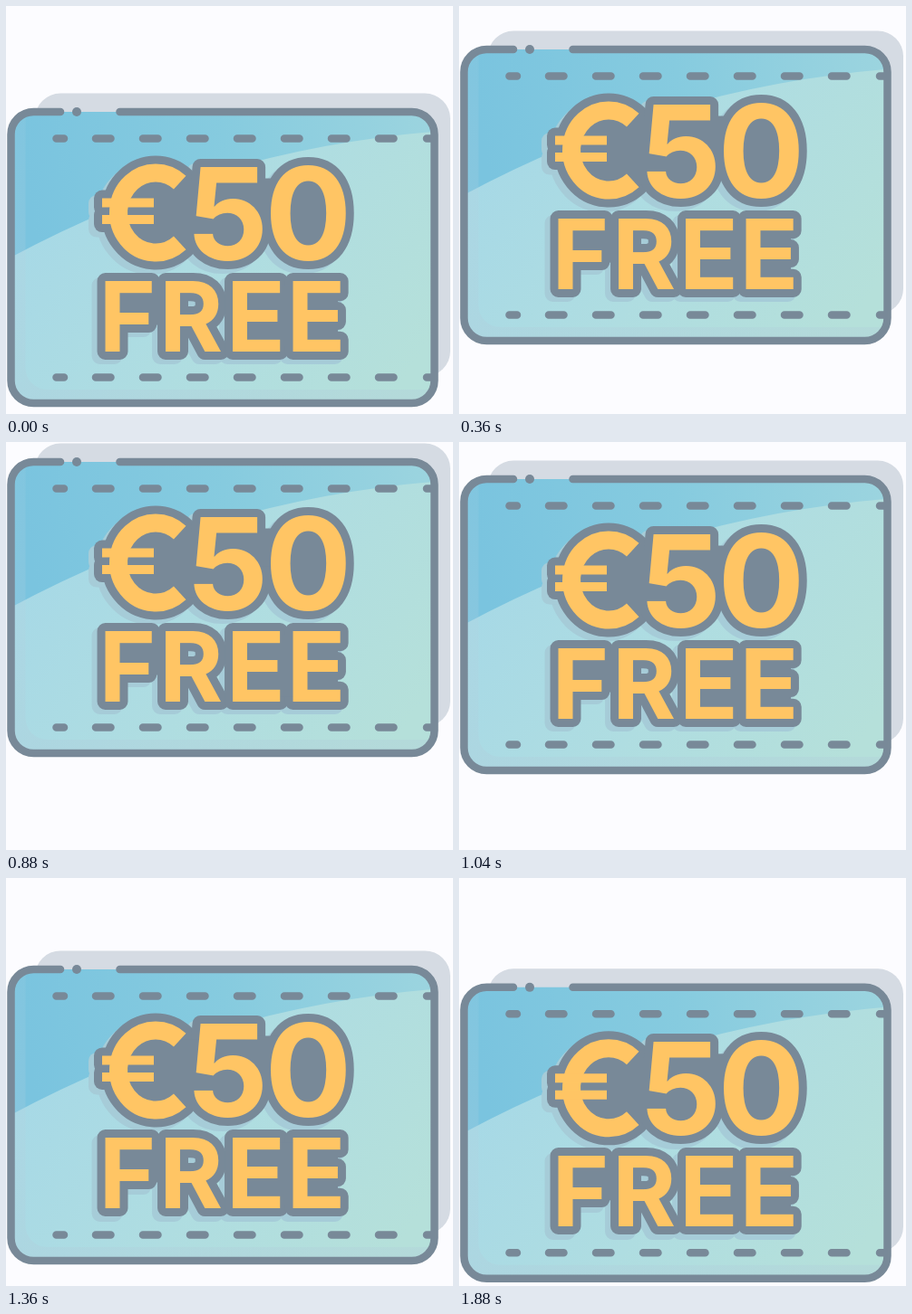
Animation of 493x451 px, one loop 1920 ms. Source, as an HTML page with a canvas:

```html
<!DOCTYPE html>
<html lang="en">
<head>
<meta charset="utf-8">
<title>Voucher</title>
<style>
html, body { margin: 0; width: 100%; height: 100%; overflow: hidden; background: #fcfcff; }
canvas { display: block; width: 493px; height: 451px; }
</style>
</head>
<body>
<canvas id="stage" width="493" height="451" role="img" aria-label="€50 FREE"></canvas>
<script>
const ctx = document.getElementById('stage').getContext('2d');
const LOOP = 1920, HALF = LOOP / 2, STEP = 40, LEAD = 66;
const HOLDS = [6, 39];
const LOW = 101.8, HIGH = 1.5, REST = 96;
const TOP = 116.5, BOTTOM = 438.5;
const GRAY = '#788998', GOLD = '#ffc564', SHADE = '#a6ccd8';

// glyph, centre of its ink
const rows = [
  { size: 142, base: 280, glyphs: [['5', 245], ['0', 333.5]] },
  { size: 107, base: 381, glyphs: [['F', 135.5], ['R', 207], ['E', 276.5], ['E', 343]] }
];

for (const row of rows) {
  row.font = `700 ${row.size}px Inter, "Liberation Sans", sans-serif`;
  ctx.font = row.font;
  row.items = row.glyphs.map(([ch, mid]) => {
    const m = ctx.measureText(ch);
    return [ch, mid - (m.actualBoundingBoxRight - m.actualBoundingBoxLeft) / 2];
  });
}

function eachGlyph(paint) {
  for (const row of rows) {
    ctx.font = row.font;
    for (const [ch, x] of row.items) paint(ch, x, row.base);
  }
}

function box(x, y, w, h, r) {
  ctx.beginPath();
  ctx.roundRect(x, y, w, h, r);
}

function gradient(x0, y0, x1, y1, ...colors) {
  const g = ctx.createLinearGradient(x0, y0, x1, y1);
  colors.forEach((c, i) => g.addColorStop(i / (colors.length - 1), c));
  return g;
}

function line(x0, x1, y) {
  ctx.moveTo(x0, y);
  ctx.lineTo(x1, y);
}

function drawPanel() {
  ctx.save();
  box(5.5, TOP, 467, BOTTOM - TOP, 25);
  ctx.clip();
  ctx.fillStyle = gradient(20, 170, 460, 110, '#7ac4df', '#86cbdf', '#9bd4df');
  ctx.fillRect(0, 110, 480, 335);

  ctx.beginPath();
  ctx.moveTo(5, 277.5);
  ctx.quadraticCurveTo(225, 158.5, 475, 138);
  ctx.lineTo(475, 445);
  ctx.lineTo(5, 445);
  ctx.fillStyle = gradient(60, 200, 420, 440, '#a7d9e6', '#afdde1', '#b5e0da');
  ctx.fill();

  // faint rim on the left and bottom
  ctx.beginPath();
  ctx.rect(0, 110, 480, 335);
  ctx.roundRect(21.5, 80, 490, 343.5, 24);
  ctx.fillStyle = gradient(0, 117, 0, 435, 'rgba(188, 212, 226, .1)', 'rgba(176, 204, 218, .32)');
  ctx.fill('evenodd');
  ctx.restore();
}

function drawLines() {
  ctx.strokeStyle = ctx.fillStyle = GRAY;
  ctx.lineWidth = 8.5;
  ctx.lineCap = ctx.lineJoin = 'round';

  ctx.beginPath();
  ctx.moveTo(125.5, TOP);
  ctx.arcTo(472.5, TOP, 472.5, BOTTOM, 25);
  ctx.arcTo(472.5, BOTTOM, 5.5, BOTTOM, 25);
  ctx.arcTo(5.5, BOTTOM, 5.5, TOP, 25);
  ctx.arcTo(5.5, TOP, 60, TOP, 25);
  ctx.lineTo(60, TOP);
  for (const y of [146, 410]) {
    line(55.5, 64, y);
    for (let i = 0; i < 7; i++) line(99 + i * 52, 115.5 + i * 52, y);
    line(464, 470, y);
  }
  ctx.stroke();

  ctx.beginPath();
  ctx.arc(78, TOP, 5, 0, Math.PI * 2);
  ctx.fill();
}

// euro sign with square-cut bars; grow widens it on all sides
function drawEuro(grow) {
  ctx.lineCap = grow ? 'round' : 'butt';
  ctx.lineWidth = 20 + grow * 2;
  ctx.beginPath();
  ctx.ellipse(165, 228, 41, 44, 0, 0.86, -0.86);
  ctx.stroke();
  for (const y of [212, 230.5]) {
    box(106 - grow, y - grow, 57 + grow * 2, 10 + grow * 2, grow);
    ctx.fill();
  }
}

function drawBacking(color) {
  ctx.fillStyle = ctx.strokeStyle = color;
  drawEuro(9);
  ctx.lineWidth = 18;
  eachGlyph((ch, x, y) => {
    ctx.strokeText(ch, x, y);
    ctx.fillText(ch, x, y);
  });
  // solid interiors
  ctx.fillRect(130, 194, 135, 72);
  ctx.fillRect(312, 190, 44, 78);
  ctx.fillRect(264, 190, 36, 42);
  ctx.fillRect(124, 308, 44, 44);
  ctx.fillRect(258, 308, 108, 68);
}

function drawLettering() {
  ctx.save();
  ctx.translate(-6, 5.5);
  drawBacking(SHADE);
  ctx.restore();
  drawBacking(GRAY);
  ctx.fillStyle = ctx.strokeStyle = GOLD;
  drawEuro(0);
  eachGlyph((ch, x, y) => ctx.fillText(ch, x, y));
}

// cubic-bezier(.25, .1, .25, 1)
function ease(x) {
  let lo = 0, hi = 1;
  for (let i = 0; i < 24; i++) {
    const s = (lo + hi) / 2;
    if (0.75 * s * (1 - s) + s ** 3 < x) lo = s; else hi = s;
  }
  const s = lo, r = 1 - s;
  return 0.3 * s * r * r + 3 * s * s * r + s ** 3;
}

// 25 steps a second, two of them held
function stepTime(t) {
  const n = Math.floor(t / STEP);
  return (HOLDS.includes(n) ? n - 1 : n) * STEP;
}

function cardTop(t) {
  const u = (stepTime(t) + LEAD) % LOOP;
  const p = ease((u % HALF) / HALF);
  return u < HALF ? LOW + (HIGH - LOW) * p : HIGH + (LOW - HIGH) * p;
}

function draw(t) {
  ctx.fillStyle = '#fcfcff';
  ctx.fillRect(0, 0, 493, 451);
  ctx.save();
  ctx.translate(0, cardTop(t) - REST);
  box(32, 96, 458, 313, 28);
  ctx.fillStyle = '#d5dbe3';
  ctx.fill();
  drawPanel();
  drawLines();
  drawLettering();
  ctx.restore();
}

const start = performance.now();
function tick() {
  draw((performance.now() - start) % LOOP);
  requestAnimationFrame(tick);
}
tick();
</script>
</body>
</html>
```
